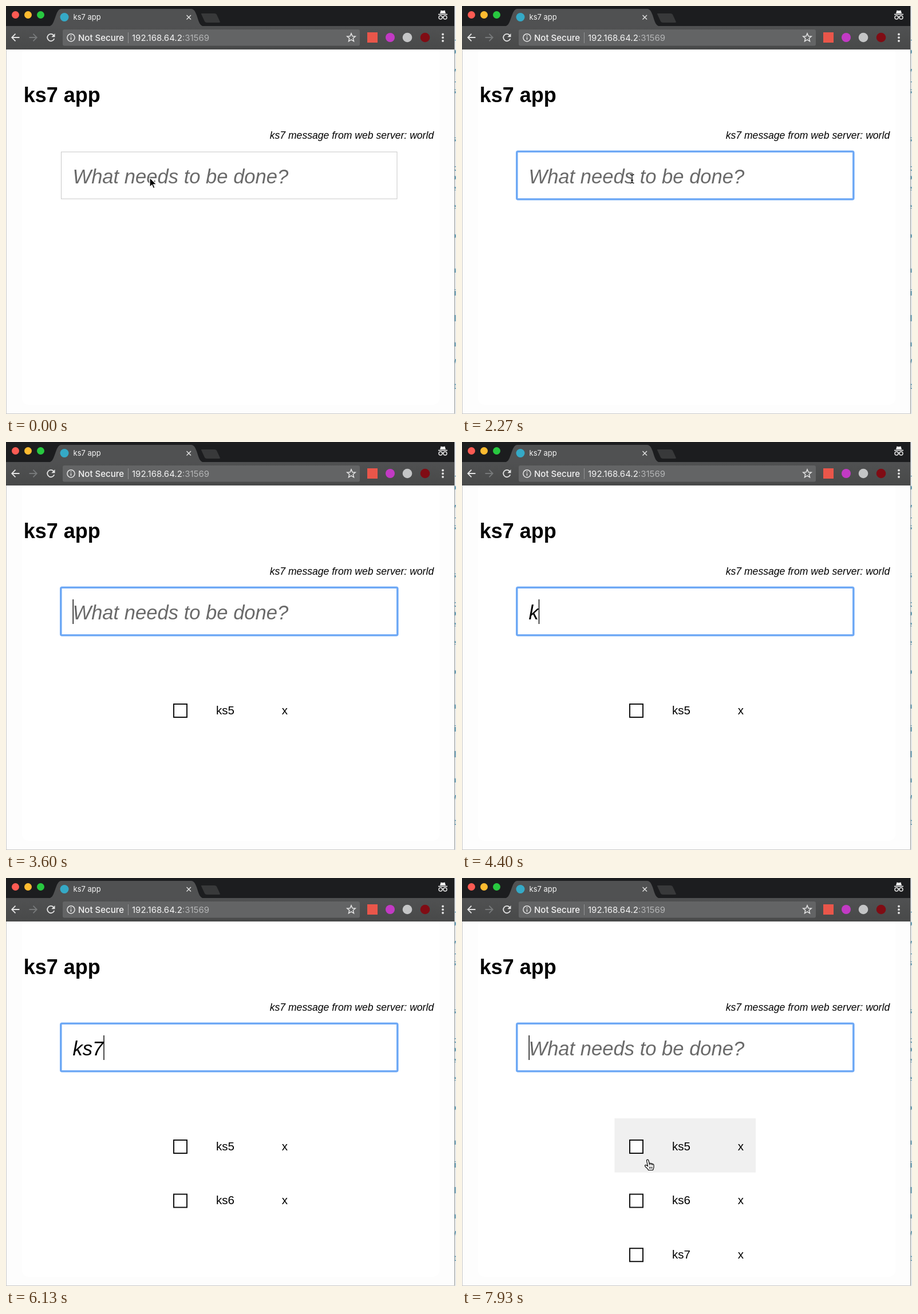
Write an HTML page that moves like this. It is 786 px wide and 713 px high and loops after 8000 ms.

```html
<!DOCTYPE html>
<html lang="en">
<head>
<meta charset="utf-8">
<title>ks7 app</title>
<style>
  html, body { margin: 0; width: 100%; height: 100%; overflow: hidden; background: #fdfdfd; }
  svg { display: block; width: 786px; height: 713px; }
  text { white-space: pre; }
  .ui { font-family: Inter, sans-serif; fill: #f4f4f4; }
  .page { font-family: "Liberation Sans", Arial, sans-serif; }
  .entry { font-size: 34.6px; font-style: italic; }
  .line { fill: none; stroke: #e4e4e4; stroke-width: 1.8; }
</style>
</head>
<body>
<svg viewBox="0 0 786 713">
  <defs>
    <clipPath id="edge"><rect x="783.5" width="2.5" height="713"/></clipPath>
    <linearGradient id="bar" x2="0" y2="1">
      <stop stop-color="#505152"/><stop offset="1" stop-color="#484949"/>
    </linearGradient>
    <filter id="soft" x="-5%" y="-20%" width="110%" height="140%"><feGaussianBlur stdDeviation=".7"/></filter>
  </defs>

  <!-- page and the window behind it -->
  <rect width="786" height="713" fill="#fdfdfd"/>
  <rect x="28" y="70" width="729" height="627" rx="12" fill="#fff"/>
  <rect x="783" width="3" height="713" fill="#e9ebec"/>
  <g id="behind" clip-path="url(#edge)" class="page" font-size="14" fill="#25789a"></g>
  <path d="M783.5 0V713" stroke="#9a9c9d"/>
  <path d="M0 712.5H784M.5 76V713" stroke="#c9c9c9"/>

  <!-- browser bar -->
  <rect width="783" height="36" fill="#1c1d1f"/>
  <rect y="35" width="783" height="41" fill="url(#bar)"/>
  <path d="M75 35.5C82 34 83 28 87 17Q91 5 96 5H324Q329 5 333 16C337 28 338 34 345 35.5Z" fill="#505152"/>
  <path d="M342 13H364Q367 13 368 15L374 28Q374 29 372 29H351Q348 29 347 27L341 14Q340.500 13 342 13Z" fill="#38393a"/>
  <circle cx="16.500" cy="15.500" r="6.500" fill="#fc5b53"/>
  <circle cx="38.500" cy="15.500" r="6.500" fill="#fdbb30"/>
  <circle cx="60.500" cy="15.500" r="6.500" fill="#28c840"/>
  <circle cx="102" cy="19.500" r="7.500" fill="#35a9c6"/>
  <text class="ui" x="117.500" y="24" font-size="13">ks7 app</text>
  <path class="line" style="stroke-width:1.4" d="M315.500 16l7.500 7.500M323 16l-7.500 7.500"/>
  <g fill="#f2f2f2">
    <path d="M758 13L759.500 7.500Q763 8.800 766.500 7.500L768 13Z"/>
    <rect x="755" y="13.800" width="16" height="1.600"/>
  </g>
  <g class="line" style="stroke-width:1.5">
    <circle cx="759" cy="20" r="3"/><circle cx="767" cy="20" r="3"/><path d="M762 19.500Q763 18.700 764 19.500"/>
  </g>
  <path class="line" d="M23.500 55H10.500M16.500 48.700L10.200 55L16.500 61.300"/>
  <path class="line" style="stroke:#77797a" d="M40.500 55H53.500M47.500 48.700L53.800 55L47.500 61.300"/>
  <path class="line" d="M83 50.800A6.200 6.200 0 1 0 84.300 57"/>
  <path d="M85.500 48V54.200H79.300Z" fill="#e4e4e4"/>
  <rect x="99" y="41" width="519" height="28.500" rx="3" fill="#636465"/>
  <g class="line" style="stroke-width:1.5"><circle cx="113.500" cy="55.300" r="6.600"/><path d="M113.500 54.500V59M113.500 51.300V53"/></g>
  <text class="ui" x="126" y="61" font-size="15" font-weight="500">Not Secure</text>
  <path d="M213.500 46V65" stroke="#929394"/>
  <text class="ui" x="220" y="61" font-size="15">192.168.64.2<tspan fill="#b4b5b6">:31569</tspan></text>
  <path id="star" class="line" style="stroke-width:1.5"/>
  <rect x="631" y="46" width="18" height="18" fill="#e9564a"/>
  <circle cx="671" cy="55" r="8" fill="#c23ac4"/>
  <circle cx="701" cy="55" r="8.300" fill="#c4c5c6"/>
  <circle cx="732" cy="55" r="8.300" fill="#800c14"/>
  <g fill="#e4e4e4"><circle cx="763" cy="49.500" r="1.900"/><circle cx="763" cy="55.200" r="1.900"/><circle cx="763" cy="61" r="1.900"/></g>

  <!-- app -->
  <g class="page">
    <text x="30.700" y="168" font-size="36" font-weight="700">ks7 app</text>
    <text x="460.700" y="232" font-size="17.600" font-style="italic">ks7 message from web server: world</text>
    <rect x="96.500" y="255" width="586.500" height="82" fill="#fff" stroke="#c8c8c8"/>
    <g id="ring" fill="none">
      <rect x="95.800" y="254.300" width="588" height="83.500" rx="2" stroke="#74adf8" stroke-width="3.600" filter="url(#soft)"/>
      <rect x="95.800" y="254.300" width="588" height="83.500" rx="2" stroke="#6ba6f3" stroke-width="1.500"/>
    </g>
    <text id="hint" class="entry" x="116.500" y="310" fill="#6a6a6a">What needs to be done?</text>
    <text id="typed" class="entry" x="116.500" y="310"></text>
    <rect id="caret" y="275" width="1.400" height="43"/>
    <g id="list"></g>
  </g>

  <!-- pointers, hot spot at 0,0 -->
  <g id="arrow"><path d="M0 0V16.500L3.900 12.900L6.400 18.700L9.100 17.500L6.600 11.900H12Z" stroke="#fff" stroke-width="1.300"/></g>
  <g id="beam" fill="none">
    <path id="beamShape" d="M-3.500-7.500Q0-7.500 0-5V5Q0 7.500-3.500 7.500M3.500-7.500Q0-7.500 0-5V5Q0 7.500 3.500 7.500M-2 2.500H2" stroke="#fff" stroke-width="2.800"/>
    <path d="M-3.500-7.500Q0-7.500 0-5V5Q0 7.500-3.500 7.500M3.500-7.500Q0-7.500 0-5V5Q0 7.500 3.500 7.500M-2 2.500H2" stroke="#000" stroke-width="1.300"/>
  </g>
  <g id="hand">
    <path d="M-1.500 1Q-1.500-.8 0-.8Q1.600-.8 2 1L3.200 6Q4.500 4.600 6 6.300Q7.500 5.300 8.700 7Q10.800 6.300 11 9V12.500Q10.500 15 9.300 17.500H1.500Q0 14.500-3.500 11.800Q-5.200 9.700-4 8.800Q-2.500 8 .5 10.500Z" fill="#fff" stroke="#000" stroke-width="1.200"/>
    <path d="M3.200 6L3.700 9M6 6.300L6.300 9M8.700 7V9.300M3.500 11.500V15M5.700 11.500V15M7.900 11.500V15" fill="none" stroke="#000"/>
  </g>
</svg>
<script>
const LOOP = 8000, TICK = 1000 / 15, BLINK = 500;
const CLICK = 740, ROW_TOP = 420, ROW_HEIGHT = 94.6;
const $ = id => document.getElementById(id);

// [time, text in the field, finished items]
const keys = [
  [CLICK, '', 0], [2600, 'k', 0], [2860, 'ks', 0], [3270, 'ks5', 0], [3590, '', 1],
  [4350, 'k', 1], [4500, 'ks', 1], [4690, 'ks6', 1], [4930, '', 2],
  [5470, 'k', 2], [5670, 'ks', 2], [5930, 'ks7', 2], [6460, '', 3]
];
// [time, x, y]
const mouse = [
  [0, 251, 300], [130, 255, 301], [270, 255, 301], [700, 297, 302],
  [7130, 297, 302], [7400, 316, 560], [7530, 321, 602], [7620, 321, 602], [7860, 324, 493]
];
const hidden = [2600, 7130];

$('list').innerHTML = ['ks5', 'ks6', 'ks7'].map((name, i) => `
  <g transform="translate(0 ${i * ROW_HEIGHT})" font-size="20.5">
    <rect x="266.500" y="${ROW_TOP}" width="246.500" height="${ROW_HEIGHT}" fill="#f0f0f0"/>
    <rect x="293" y="458" width="23" height="23" fill="#fff" stroke="#111" stroke-width="2"/>
    <text x="367" y="475.500">${name}</text><text x="481.700" y="475.500">x</text>
  </g>`).join('');
const rows = [...$('list').children];

const scraps = [[62, 'r'], [79, 'o'], [113, 'v'], [135, 'r'], [148, 's'], [232, 's'], [283, 'k'],
  [299, 'o'], [318, 'e'], [350, 'e'], [401, 'o'], [461, 'n'], [501, 'i'], [546, 'd'],
  [590, 'n'], [620, 'w'], [664, 't']];
$('behind').innerHTML = scraps.map(([y, c]) =>
  `<text x="786" y="${y + 5}" text-anchor="end">${c}</text>`).join('');

$('star').setAttribute('d', 'M' + Array.from({ length: 10 }, (_, i) => {
  const r = i % 2 ? 3.4 : 7.6, a = i * Math.PI / 5;
  return `${603 + r * Math.sin(a)} ${55.5 - r * Math.cos(a)}`;
}).join('L') + 'Z');

const show = (el, on) => { el.style.display = on ? '' : 'none'; };

function mouseAt(t) {
  const i = mouse.findIndex(p => p[0] > t);
  if (i < 0) return mouse.at(-1).slice(1);
  const [t0, x0, y0] = mouse[i - 1], [t1, x1, y1] = mouse[i];
  const u = (t - t0) / (t1 - t0), k = u * u * (3 - 2 * u);
  return [x0 + (x1 - x0) * k, y0 + (y1 - y0) * k];
}

function render(t) {
  const key = keys.findLast(k => k[0] <= t);
  const [since, text, done] = key || [0, '', 0];
  show($('ring'), key);
  show($('hint'), !text);
  $('typed').textContent = text;
  $('caret').setAttribute('x', 116.5 + (text ? $('typed').getComputedTextLength() : 0));
  show($('caret'), key && Math.floor((t - since) / BLINK) % 2 === 0);

  const [x, y] = mouseAt(t);
  const visible = t < hidden[0] || t >= hidden[1];
  const over = visible ? Math.floor((y - ROW_TOP) / ROW_HEIGHT) : -1;
  rows.forEach((row, i) => {
    show(row, i < done);
    show(row.firstElementChild, i === over);
  });
  const pointer = over >= 0 ? 'hand' : t > 60 && y < 337 ? 'beam' : 'arrow';
  for (const id of ['arrow', 'beam', 'hand']) {
    show($(id), visible && id === pointer);
    $(id).setAttribute('transform', `translate(${x} ${y})`);
  }
}

const start = performance.now();
function frame() {
  const t = (performance.now() - start) % LOOP;
  render(Math.floor((t + 4) / TICK) * TICK);
  requestAnimationFrame(frame);
}
frame();
</script>
</body>
</html>
```
